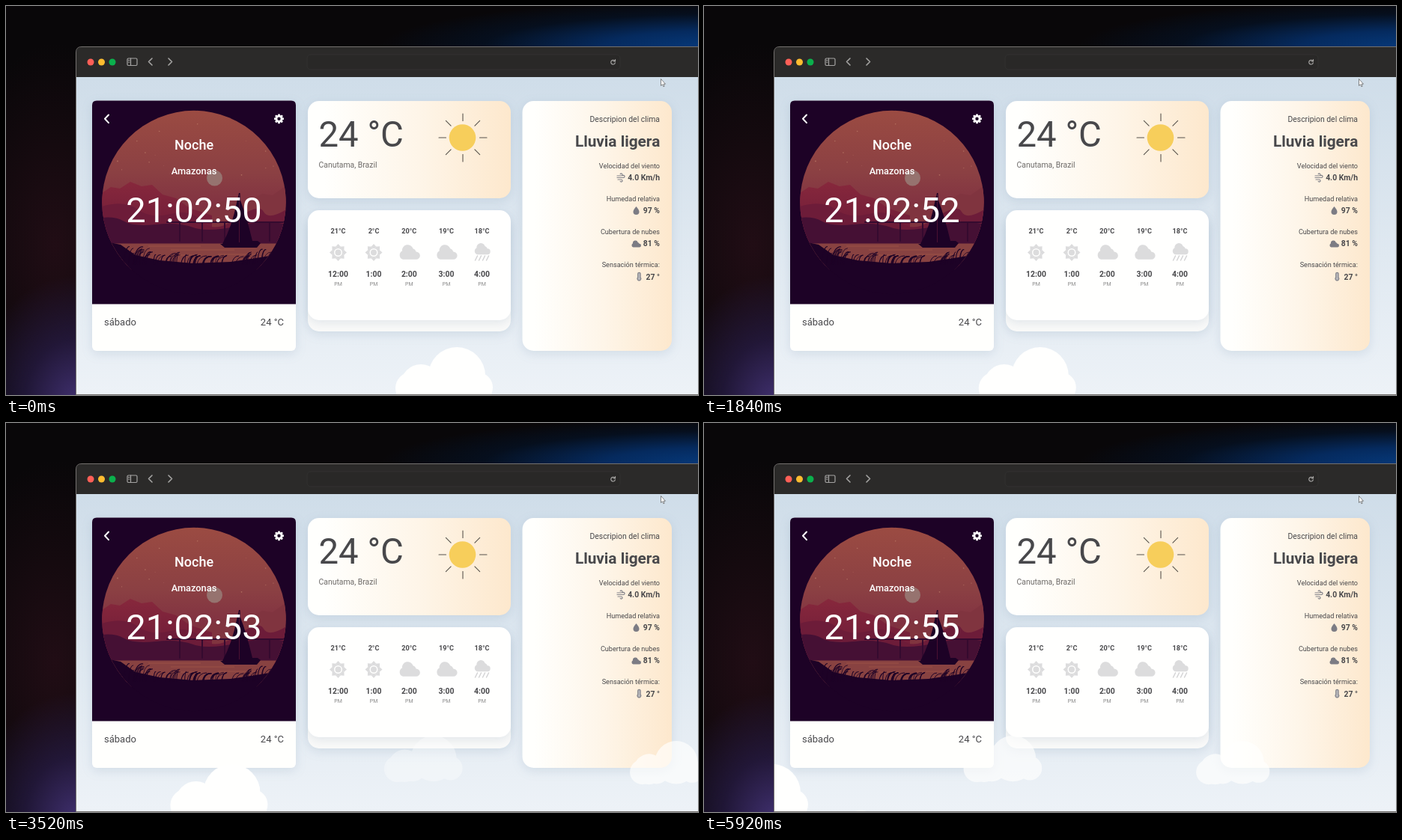
Write an HTML page that moves like this. It is 924 px wide and 520 px high and loops after 6 s.

```html
<!DOCTYPE html>
<html lang="es">
<head>
<meta charset="utf-8">
<title>Clima</title>
<style>
html, body { margin: 0; width: 100%; height: 100%; overflow: hidden; background: #090709; }
svg {
  display: block; width: 924px; height: 520px;
  font-family: Roboto, Arial, sans-serif;
  background:
    radial-gradient(ellipse 460px 62px at 960px 54px, #063a7c, #052a5e 35%, #03163088 70%, transparent),
    radial-gradient(ellipse 140px 170px at 95px 530px, #40306f, #281d4baa 50%, transparent),
    radial-gradient(ellipse 140px 270px at 65px 320px, #210d15, transparent),
    #090709;
}
.card { filter: drop-shadow(0 4px 7px rgba(60, 100, 140, .13)); }
.line { fill: none; stroke-linecap: round; stroke-linejoin: round; }
</style>
</head>
<body>
<svg viewBox="0 0 924 520">
  <defs>
    <linearGradient id="page" x2="0" y2="1">
      <stop stop-color="#cfdde9"/><stop offset="1" stop-color="#edf2f7"/>
    </linearGradient>
    <linearGradient id="warm">
      <stop offset=".08" stop-color="#fffffd"/><stop offset=".55" stop-color="#fef5e8"/><stop offset="1" stop-color="#fde8cd"/>
    </linearGradient>
    <linearGradient id="sky" x2="0" y2="1">
      <stop stop-color="#9b4b42"/><stop offset=".4" stop-color="#8b4043"/><stop offset=".7" stop-color="#7d2c41"/>
    </linearGradient>
    <linearGradient id="hill" x2="0" y2="1">
      <stop stop-color="#87283c"/><stop offset="1" stop-color="#681838"/>
    </linearGradient>
    <clipPath id="window"><path d="M94 520V62q0-7 7-7H924V520z"/></clipPath>
    <clipPath id="disc"><circle cx="251" cy="262.500" r="122.700"/></clipPath>
    <g id="cloud">
      <circle cx="82" cy="38" r="38"/><circle cx="34" cy="50" r="27"/>
      <circle cx="22" cy="55" r="22"/><circle cx="110" cy="54" r="20"/>
      <circle cx="47" cy="52" r="24"/><circle cx="82" cy="51" r="23"/>
    </g>
    <path id="cloudIcon" d="M-8 9A6 6 0 0 1-9-2A7.200 7.200 0 0 1 5-5A6 6 0 0 1 9-1A5 5 0 0 1 9 9z"/>
    <g id="sunIcon" fill="#dcdcdd"></g>
  </defs>

  <g clip-path="url(#window)">
    <path fill="#2b2a29" d="M94 54h830v42H94z"/>
    <path fill="url(#page)" d="M94 95h830v425H94z"/>
    <rect x="402" y="65" width="418" height="20" rx="5" fill="#292827" stroke="#323130"/>
    <circle cx="113" cy="75" r="4.500" fill="#ff5f57"/>
    <circle cx="127.500" cy="75" r="4.500" fill="#fdbc30"/>
    <circle cx="142" cy="75" r="4.500" fill="#0bb04c"/>
    <g class="line" stroke="#a5a4a3" stroke-width="1.200">
      <rect x="162" y="70" width="13" height="9.500" rx="1.500"/>
      <path d="M166.500 70v9.500M163.500 72.500h1.500m-1.500 2.500h1.500"/>
      <path stroke-width="1.600" d="M195 70l-4.500 4.500L195 79M217 70l4.500 4.500L217 79"/>
      <path d="M813 73.800a2.800 2.800 0 1 0 .300 2M813.500 71.500v2.500h-2.500"/>
    </g>

    <g class="card">
      <rect x="115" y="126.500" width="272" height="334.500" rx="6" fill="#fffffd"/>
      <path fill="#1d0226" d="M115 398.500V132.500q0-6 6-6H381q6 0 6 6V398.500z"/>
    </g>
    <g clip-path="url(#disc)">
      <path fill="url(#sky)" d="M128 139h246v210H128z"/>
      <circle cx="278.500" cy="230" r="10.500" fill="#96736f"/>
      <g id="stars" fill="#c78a72"></g>
      <path fill="#80343f" d="M250 275l40-14 30 2 22-12 14 2 18-13V320H250z"/>
      <path fill="url(#hill)" d="M128 250l12-8 12 2 14-9 15 6 14-2 14 13 18 5 18 13 30 10V320H128z"/>
      <path fill="#6d1c39" d="M128 268q30-9 48 4t44 6 42 10 46-4 36-9 32-4V320H128z"/>
      <path fill="#451034" d="M128 283q18-2 30 5t42 4 50 4 60-2 64-2V318H128z"/>
      <path class="line" stroke="#350a2f" stroke-width="2" d="M215 289H374M232 289v25M262 289v25M292 289v25M322 289v25M352 289v25"/>
      <path fill="#884241" d="M128 317.500H374v35H128z"/>
      <path stroke="#a85a4a" opacity=".6" d="M190 321h70m-40 5h85m-22 6h50m-110 1h38"/>
      <path fill="#1d0226" d="M311 250h1.500l.5 10q8 20 16 54h7l4 3-5 6H292l-6-5h3q13-24 19-55z"/>
      <path stroke="#4a1032" d="M311.500 252v64"/>
      <path fill="#1d0226" d="M128 314l25 5 20 14 32 7 45 4 50-2 40-6 34-6V386H128z"/>
      <g id="grass" class="line" stroke="#1d0226"></g>
      <path fill="#1d0226" d="M128 347h246v40H128z"/>
    </g>
    <path class="line" stroke="#fff" stroke-width="2" d="M137 145.500l-5 5.300 5 5.300"/>
    <g id="gear" fill="#fff" transform="translate(364.500 150.800)"><circle r="3.500" fill="none" stroke="#fff" stroke-width="2.600"/></g>

    <rect class="card" x="403" y="127" width="271" height="130" rx="15" fill="url(#warm)"/>
    <circle cx="609.500" cy="176" r="17.800" fill="#f7ce5b"/>
    <g id="rays" class="line" stroke="#57524c" stroke-width="1.100" transform="translate(610 176)"></g>

    <rect class="card" x="403" y="280" width="271" height="155" rx="15" fill="#fafaf9"/>
    <rect class="card" x="403" y="273" width="271" height="147" rx="15" fill="#fffffe"/>
    <rect class="card" x="689.500" y="127" width="199.500" height="334" rx="15" fill="url(#warm)"/>
    <g class="line" stroke="#84848b" stroke-width="1.200">
      <path d="M816 227h5.500a1.500 1.500 0 1 0-1.300-2.200M816 229.500h8.500a1.600 1.600 0 1 0-1.300-2.600M817 232h4.500a1.500 1.500 0 1 1-1.300 2.200"/>
      <path fill="#b9b9bd" d="M843.700 363v-5a1.700 1.700 0 0 1 3.400 0v5a2.300 2.300 0 1 1-3.400 0z"/>
    </g>
    <path fill="#7c7c84" d="M841.500 268q4 4.500 4 7a4 4 0 0 1-8 0q0-2.500 4-7z"/>
    <use href="#cloudIcon" fill="#7c7c84" transform="translate(841.300 318.300) scale(.48)"/>
    <g id="hours"></g>
    <g id="labels"></g>
    <g id="clouds" fill="#fffffe"></g>
  </g>
  <path fill="none" stroke="#74716f" d="M924 519.500H93.500V62q0-7.500 7.500-7.500H924"/>
  <path fill="#fff" stroke="#555" stroke-width=".7" d="M874.500 97.500v9l2-1.700 1.400 3 1.300-.6-1.300-2.900h2.600z"/>
</svg>
<script>
const LOOP = 6000, STEP = 80;
const $ = id => document.getElementById(id);

function add(parent, tag, attrs, content) {
  const node = document.createElementNS("http://www.w3.org/2000/svg", tag);
  for (const key in attrs) node.setAttribute(key, attrs[key]);
  if (content) node.textContent = content;
  return parent.appendChild(node);
}

function label(content, x, y, size, weight = 400, anchor = "start", fill = "#48484b") {
  return add($("labels"), "text",
    { x, y, "font-size": size, "font-weight": weight, "text-anchor": anchor, fill }, content);
}

let seed = 11;
function random() {
  seed = (seed * 16807) % 2147483647;
  return seed / 2147483647;
}

// Clock card
label("Noche", 251, 192, 18, 500, "middle", "#fff");
label("Amazonas", 251, 225, 12.8, 500, "middle", "#fff");
const clock = label("", 251, 288.5, 47, 400, "middle", "#fff");
label("sábado", 131, 426.5, 13);
label("24 °C", 371, 426.5, 13, 400, "end");

// Current weather
label("24 °C", 417.5, 187.5, 47.3);
label("Canutama, Brazil", 417.5, 216, 10.4, 400, "start", "#6c6967");
label("Descripion del clima", 873, 154.5, 10.4, 400, "end");
label("Lluvia ligera", 873.3, 187.5, 20.8, 700, "end");
[
  ["Velocidad del viento", "4.0 Km/h"],
  ["Humedad relativa", "97 %"],
  ["Cubertura de nubes", "81 %"],
  ["Sensación térmica:", "27 °"]
].forEach(([name, value], i) => {
  const y = 216.5 + i * 44.3;
  label(name, 873, y, 9.1, 400, "end");
  label(value, 873, y + 16.3, 10.4, 700, "end");
});

for (let i = 0; i < 8; i++) {
  const transform = `rotate(${i * 45})`;
  add($("rays"), "path", { d: "M0-22.500V-32", transform });
  add($("gear"), "path", { d: "M-1.200-6.400h2.400l.500 2.400h-3.400z", transform });
  add($("sunIcon"), "path", { d: "M-4-7L0-11.500L4-7z", transform });
}
add($("sunIcon"), "circle", { r: 6.5, fill: "none", stroke: "#dcdcdd", "stroke-width": 2 });
add($("sunIcon"), "circle", { r: 4 });

// Hourly forecast
[
  [443.5, "21°C", "12:00", "sun"],
  [491, "2°C", "1:00", "sun"],
  [538.3, "20°C", "2:00", "cloud"],
  [588, "19°C", "3:00", "cloud"],
  [635.5, "18°C", "4:00", "rain"]
].forEach(([x, temp, hour, icon]) => {
  label(temp, x, 304, 9.1, 700, "middle");
  label(hour, x, 362, 10.4, 700, "middle");
  label("PM", x, 374, 7, 400, "middle", "#858585");
  const rain = icon == "rain";
  add($("hours"), "use", {
    href: icon == "sun" ? "#sunIcon" : "#cloudIcon", fill: "#dcdcdd",
    transform: `translate(${x} ${rain ? 325 : 329.5}) scale(${rain ? .8 : icon == "cloud" ? 1.04 : 1})`
  });
  if (rain) add($("hours"), "path", {
    class: "line", stroke: "#d4d4d5", "stroke-width": 1.5,
    d: [-6, -1, 4, 9].map(dx => `M${x + dx} 334l-3 6`).join("")
  });
});

// Night scene details
for (let i = 0; i < 22; i++) {
  add($("stars"), "circle", {
    cx: 145 + random() * 212, cy: 150 + random() * 80, r: .4 + random() * .6, opacity: .6
  });
}
for (let i = 0; i < 75; i++) {
  const x = 150 + random() * 200;
  const height = 6 + random() * 14 * Math.abs(x - 265) / 100 + 4;
  const lean = 2 + random() * 11;
  add($("grass"), "path", {
    d: `M${x} 345q${lean * .2} ${-height} ${lean} ${-height}`,
    "stroke-width": .6 + random() * .7
  });
}

const clamp = v => Math.max(0, Math.min(1, v));
const clouds = [
  { y: 456, scale: 1, x: t => t < 720 ? 520 - .0764 * t : 465 - .0877 * (t - 720), alpha: () => 1 },
  { y: 418, scale: .805, x: t => 468 - .066 * (t - 4080), alpha: t => .68 * clamp((t - 3100) / 800) },
  { y: 425, scale: .755, x: t => 792 - .0733 * (t - 4080), alpha: () => .68 },
  { y: 517.5, scale: .6, x: t => 187 - .0375 * (t - 5200), alpha: t => .5 * clamp((t - 4400) / 800) }
];
for (const cloud of clouds) cloud.node = add($("clouds"), "use", { href: "#cloud" });

function draw(now) {
  const t = Math.floor(now % LOOP / STEP) * STEP;
  clock.textContent = "21:02:" + (51 + Math.floor((t - 720) / 1120));
  for (const { node, x, y, scale, alpha } of clouds) {
    node.setAttribute("transform", `translate(${x(t)} ${y}) scale(${scale})`);
    node.setAttribute("opacity", alpha(t));
  }
}

const start = performance.now();
function tick() {
  draw(performance.now() - start);
  requestAnimationFrame(tick);
}
tick();
</script>
</body>
</html>
```
